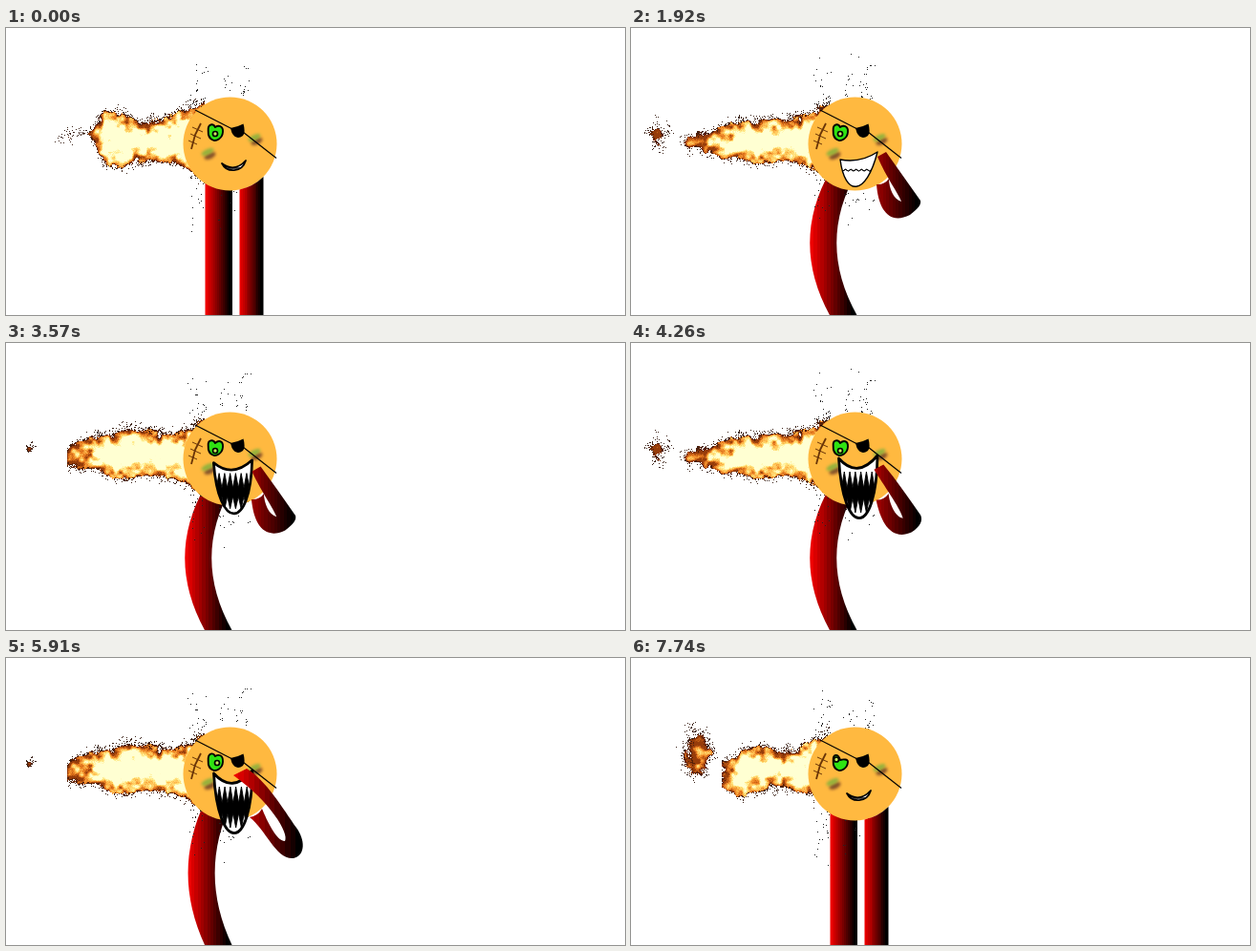
Animation of 648 by 301 pixels, one loop 7770 ms. Source, as an HTML page with a canvas:

```html
<!DOCTYPE html>
<html>
<head>
<meta charset="utf-8">
<title>Laughing pirate ball</title>
<style>
html, body { margin: 0; width: 648px; height: 301px; overflow: hidden; background: #fff; }
canvas { display: block; }
</style>
</head>
<body>
<canvas id="stage" width="648" height="301"></canvas>
<script>
const LOOP = 7770, STEP = 30, FIRE = 780;
const ctx = document.getElementById('stage').getContext('2d');

const clamp = (v, a, b) => Math.max(a, Math.min(b, v));
const mix = (a, b, k) => a.map((v, i) => v + (b[i] - v) * k);
const hash = (i, j) => {
  const s = Math.sin(i * 127.1 + j * 311.7) * 43758.5453;
  return s - Math.floor(s);
};

// Keys are [time, ...values]; returns values blended linearly at t.
function at(keys, t) {
  let i = 0;
  while (i < keys.length - 1 && keys[i + 1][0] <= t) i++;
  const a = keys[i], b = keys[Math.min(i + 1, keys.length - 1)];
  const k = a === b ? 0 : (t - a[0]) / (b[0] - a[0]);
  return mix(a, b, k).slice(1);
}

// ---- fire ----
const tips = [[0, 86], [360, 50], [450, 64], [540, 78], [720, 95], [780, 86]];
const tops = [
  [0, 110, 87, 89, 97, 96, 95, 84, 78],
  [360, 120, 110, 104, 98, 94, 95, 92, 79],
  [450, 106, 102, 96, 87, 90, 96, 92, 79],
  [540, 100, 88, 95, 95, 90, 96, 88, 79],
  [720, 110, 100, 92, 93, 96, 97, 88, 79],
  [780, 110, 87, 89, 97, 96, 95, 84, 78]];
const bottoms = [
  [0, 112, 140, 147, 139, 139, 142, 150, 160],
  [360, 121, 127, 135, 139, 140, 140, 142, 160],
  [450, 130, 128, 138, 141, 140, 138, 146, 160],
  [540, 105, 126, 132, 140, 143, 138, 145, 160],
  [720, 135, 144, 140, 136, 134, 140, 146, 160],
  [780, 112, 140, 147, 139, 139, 142, 150, 160]];
// loose tongue: centre x, y, width, height
const tongue = [[0, 72, 112, 8, 4], [180, 50, 114, 14, 9], [360, 27, 113, 15, 20],
  [450, 24, 112, 1, 1], [540, 36, 106, 19, 9], [720, 70, 98, 26, 38], [780, 72, 112, 8, 4]];
const heatMap = [[0, 150, 60, 10], [.3, 232, 122, 30], [.58, 255, 190, 80],
  [.82, 255, 236, 140], [1, 255, 255, 210]];

// Value noise that repeats every n cells in u.
function noise(u, v, n) {
  const i = Math.floor(u), j = Math.floor(v);
  let f = u - i, g = v - j;
  f *= f * (3 - 2 * f);
  g *= g * (3 - 2 * g);
  const p = i % n, q = (i + 1) % n;
  const a = hash(p, j), b = hash(q, j), c = hash(p, j + 1), d = hash(q, j + 1);
  return a + (b - a) * f + (c - a + (a - b - c + d) * f) * g;
}

const X0 = 14, Y0 = 66, W = 194, H = 102;
const fireImage = ctx.createImageData(W, H);

function drawFire(t) {
  const ph = t % FIRE, shift = ph / FIRE * 144;
  const [tip] = at(tips, ph), up = at(tops, ph), down = at(bottoms, ph);
  const [bx, by, bw, bh] = at(tongue, ph);
  const px = fireImage.data;
  px.fill(0);
  for (let x = X0; x < X0 + W; x++) {
    const s = (x - tip) / (206 - tip) * 7;
    const i = clamp(Math.floor(s), 0, 6), f = s - i;
    const top = up[i] + (up[i + 1] - up[i]) * f;
    const bot = down[i] + (down[i + 1] - down[i]) * f;
    for (let y = Y0; y < Y0 + H; y++) {
      const main = s < 0 ? -99 : Math.min(y - top, bot - y, (x - tip) * .8 + 2);
      const loose = (1 - Math.hypot((x - bx) / (bw / 2), (y - by) / (bh / 2))) * Math.min(bw, bh) / 2;
      let depth = Math.max(main, loose);
      if (depth < -15) continue;
      const u = x + shift;
      const n1 = noise(u / 9, y / 9, 16), n2 = noise(u / 4.5, y / 4.5, 32);
      const grain = hash(Math.floor(u) % 144, y);
      depth += (n1 - .5) * 8 + (n2 - .5) * 5 + (grain - .5) * 2.5;
      const o = ((y - Y0) * W + x - X0) * 4;
      let rgb;
      if (depth < 0) {
        const density = (y < 112 ? .3 : .16) * (1 + depth / 8);
        if (hash(y, Math.floor(u) % 144 + 7) > density) continue;
        rgb = [60, 35, 25];
      } else if (depth < 1.1) {
        rgb = [85, 32, 8];
      } else {
        const cool = Math.max(0, (112 - x) / 150);
        const heat = depth / 11 + (n2 - .5) * .75 + (n1 - .5) * .5 - cool;
        rgb = at(heatMap, clamp(heat, 0, 1));
      }
      px[o] = rgb[0];
      px[o + 1] = rgb[1];
      px[o + 2] = rgb[2];
      px[o + 3] = 255;
    }
  }
  ctx.putImageData(fireImage, X0, Y0);
}

// Fine soot rising above the ball and sinking below it.
function drawSoot(t) {
  ctx.fillStyle = '#222';
  for (let i = 0; i < 210; i++) {
    const p = (hash(i, 3) + t / FIRE) % 1;
    if (hash(i, 9) < p * .95) continue;
    const r = hash(i, 5), rising = i % 5 < 3;
    const x = r < .45 ? 192 + r * 36 : 220 + (r - .45) * 64;
    const lean = (hash(i, 11) - .4) * 10 * p;
    const y = rising ? 84 - p * 58 : 152 + p * 67;
    ctx.fillRect(Math.round(x + lean), Math.round(y), 1, 1);
  }
}

// ---- limbs ----
function bands(x0, x1, red) {
  const g = ctx.createLinearGradient(x0, 0, x1, 0), n = 14;
  for (let i = 0; i < n; i++) {
    const c = `rgb(${Math.round(red * Math.max(0, 1 - i / (n - 2)))},0,0)`;
    g.addColorStop(i / n, c);
    g.addColorStop((i + 1) / n, c);
  }
  return g;
}

const bend = [[0, 0], [1900, 1], [5700, 1], [7050, 0]];

function drawLeg(t) {
  const [b] = at(bend, t);
  ctx.fillStyle = bands(208.5 - 21 * b, 237, 238);
  ctx.beginPath();
  ctx.moveTo(208.5, 150);
  ctx.quadraticCurveTo(208.5 - 42.5 * b, 225, 208.5, 302);
  ctx.lineTo(237, 302);
  ctx.quadraticCurveTo(237 - 43.5 * b, 225, 237, 150);
  ctx.fill();
}

// Arm poses: 17 outline points, then the strength of the red.
const straight = [];
for (let i = 0; i < 7; i++) straight.push(269.5, 156 + i * 146 / 6);
for (let i = 0; i < 10; i++) straight.push(244.5, 302 - i * 132.5 / 9);
straight.push(236);
const out = [269, 157, 269, 189, 278, 202, 293.5, 200, 309, 199, 331, 186, 357, 164,
  352, 182, 341, 200, 327, 216, 311, 224, 298, 230, 285, 226, 276, 214, 265, 201, 257, 183, 251, 165, 205];
const face = [270, 158, 270, 168, 275, 180, 283, 182, 279, 172, 268, 158, 258, 135,
  267, 130, 279, 147, 291, 164, 303, 181, 304, 185, 301, 189, 292, 196, 270, 207, 259, 190, 257, 164, 150];
const rub = [268, 158, 273, 170, 283, 192, 292, 192, 297, 184, 276, 150, 238, 123,
  252, 116, 272, 128, 290, 158, 304, 178, 313, 190, 314, 207, 301, 210, 283, 212, 272, 180, 255, 167, 236];
const armKeys = [
  [0, straight], [720, out], [820, mix(straight, out, 1.12)], [1570, face], [1920, face],
  [2880, mix(face, rub, -.12)], [4260, mix(face, rub, .18)], [4700, mix(face, rub, .2)],
  [5460, rub], [5910, rub], [6240, mix(rub, out, .2)], [6640, out], [7050, straight]
].map(([t, pose]) => [t, ...pose]);

function drawArm(t) {
  const p = at(armKeys, t), red = p.pop();
  const xs = p.filter((v, i) => i % 2 === 0);
  const curve = i => ctx.bezierCurveTo(...p.slice(i * 2, i * 2 + 6));
  ctx.fillStyle = bands(Math.min(...xs), Math.max(...xs), red);
  ctx.beginPath();
  ctx.moveTo(p[0], p[1]);
  curve(1);
  curve(4);
  ctx.lineTo(p[14], p[15]);
  curve(8);
  curve(11);
  curve(14);
  ctx.quadraticCurveTo((p[0] + p[32]) / 2 + 2, (p[1] + p[33]) / 2 + 3.5, p[0], p[1]);
  ctx.fill();
}

// ---- face ----
function line(color, width, ...pts) {
  ctx.strokeStyle = color;
  ctx.lineWidth = width;
  ctx.beginPath();
  for (let i = 0; i < pts.length; i += 2) ctx.lineTo(pts[i], pts[i + 1]);
  ctx.stroke();
}

function smudge(x, y, color, rx, ry) {
  ctx.fillStyle = color;
  ctx.beginPath();
  ctx.ellipse(x, y, rx, ry, -.45, 0, 7);
  ctx.fill();
}

function drawHead() {
  ctx.fillStyle = '#ffb940';
  ctx.beginPath();
  ctx.arc(234.5, 121.5, 49, 0, 7);
  ctx.fill();

  ctx.filter = 'blur(1.5px)';
  for (const [x, y] of [[212, 132], [261, 117]]) {
    smudge(x + 1.5, y + 2, '#87522a', 6.5, 3.2);
    smudge(x - 1, y - 2, '#92b23c', 7, 2.8);
  }
  ctx.filter = 'none';

  const scar = '#6a3508';
  line(scar, 1.8, 204, 100, 198, 112, 194, 127);
  line(scar, 1, 195, 104, 206, 109);
  line(scar, 1, 193, 111, 204, 116);
  line(scar, 1, 191, 118, 200, 122);

  line('#000', 1.2, 198, 86, 237, 106);
  line('#000', 1.2, 248, 109, 283, 136.5);
  ctx.fillStyle = '#000';
  ctx.beginPath();
  ctx.moveTo(235, 105);
  ctx.quadraticCurveTo(242, 104, 248.5, 100.5);
  ctx.quadraticCurveTo(251, 109, 248, 113);
  ctx.quadraticCurveTo(241, 118, 236.5, 110);
  ctx.fill();
}

// pupil x, y, then heights of left bump, notch and right bump
const eyeKeys = [[0, 219, 111, 100, 104, 102], [720, 221.5, 107, 98, 101, 101],
  [1920, 219, 111, 100, 104, 102], [2880, 219, 113, 101, 105, 102], [4260, 219, 113, 101, 105, 102],
  [5910, 221, 110, 99, 103, 101], [7740, 215, 106.5, 100, 107, 106]];

function drawEye(t) {
  const [x, y, a, c, b] = at(eyeKeys, t);
  ctx.fillStyle = '#2fe312';
  ctx.strokeStyle = '#000';
  ctx.lineWidth = 1.9;
  ctx.beginPath();
  ctx.moveTo(211.7, 108);
  ctx.bezierCurveTo(211, a, 217, a, 219, c);
  ctx.bezierCurveTo(222, b, 227.5, b, 227, 109);
  ctx.bezierCurveTo(226.5, 116, 220, 119, 216.5, 117.5);
  ctx.bezierCurveTo(213, 116, 211.5, 112, 211.7, 108);
  ctx.fill();
  ctx.stroke();
  ctx.fillStyle = '#c8e860';
  ctx.lineWidth = 1.7;
  ctx.beginPath();
  ctx.arc(x, y, 2.5, 0, 7);
  ctx.fill();
  ctx.stroke();
}

// left corner, lip control, right corner, two jaw controls,
// then upper gum, upper tips, lower tips, lower gum, outline width
const smile = [226, 142, 239, 152, 251, 139, 247, 152, 231, 152, 147, 147, 147, 147, 1.8];
const grin = [221, 136, 238, 146, 257, 130, 255, 158, 223, 158, 142, 144, 144, 142.5, 1.4];
const bigGrin = [219, 138, 240, 142, 258, 130, 246, 177, 224, 177, 148, 150, 150, 148.5, 1.4];
const open = [217, 135, 237, 140, 257, 133, 253, 181, 224, 181, 140, 152, 157, 165, 2.6];
const huge = [217.5, 121, 237, 143, 258, 118, 257, 205, 222, 205, 135, 152, 163, 178, 2.8];
const mouthKeys = [[0, smile], [720, grin], [1570, bigGrin], [1920, bigGrin], [2880, open],
  [3900, huge], [5910, huge], [7050, smile]].map(([t, m]) => [t, ...m]);

function drawMouth(t) {
  const m = at(mouthKeys, t), [lx, ly, tx, ty, rx, ry] = m;
  const [gumU, tipU, tipL, gumL, width] = m.slice(10);
  const lips = new Path2D();
  lips.moveTo(lx, ly);
  lips.quadraticCurveTo(tx, ty, rx, ry);
  lips.bezierCurveTo(...m.slice(6, 10), lx, ly);
  lips.closePath();

  ctx.save();
  ctx.clip(lips);
  ctx.fillStyle = '#fff';
  ctx.fill(lips);
  const n = 14, step = (rx - lx) / n;
  ctx.beginPath();
  for (let i = 0; i <= n; i++) ctx.lineTo(lx + i * step, i % 2 ? tipU : gumU);
  for (let i = n; i >= 0; i--) ctx.lineTo(lx + i * step, i % 2 ? tipL : gumL);
  ctx.closePath();
  ctx.fillStyle = ctx.strokeStyle = '#000';
  ctx.lineWidth = .9;
  ctx.fill();
  ctx.stroke();
  ctx.restore();

  ctx.strokeStyle = '#000';
  ctx.lineWidth = width;
  ctx.lineJoin = 'round';
  ctx.stroke(lips);
}

function frame() {
  const t = Math.floor(performance.now() % LOOP / STEP) * STEP;
  ctx.clearRect(0, 0, 648, 301);
  drawFire(t);
  drawLeg(t);
  drawSoot(t);
  drawHead();
  drawEye(t);
  drawMouth(t);
  drawArm(t);
  requestAnimationFrame(frame);
}
frame();
</script>
</body>
</html>
```
